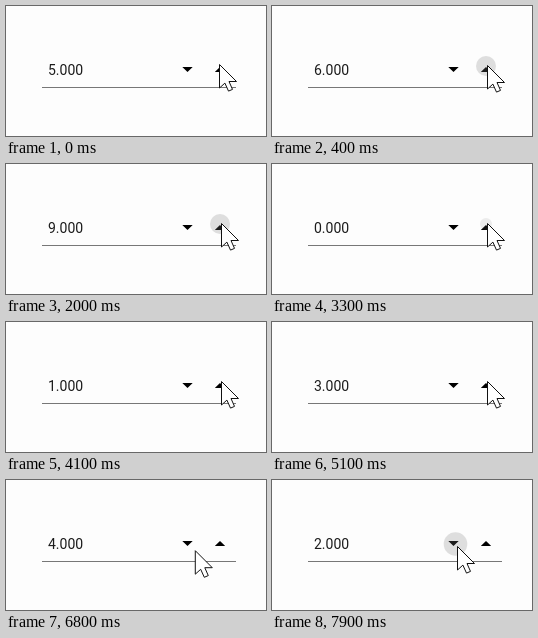
An HTML page that plays this animation: 260 px wide and 130 px high, repeating every 8 s.

```html
<!DOCTYPE html>
<html lang="en">
<head>
<meta charset="utf-8">
<title>Number spinner</title>
<style>
  html, body { margin: 0; width: 100%; height: 100%; overflow: hidden; background: #fdfdfd; }
  svg { display: block; width: 260px; height: 130px; }
  text { font: 14px Roboto, Arial, sans-serif; fill: #1c1c1c; }
</style>
</head>
<body>
<svg viewBox="0 0 260 130">
  <text id="value" x="42" y="69">5.000</text>
  <path d="M36 81.5H230" stroke="#777"/>
  <path d="M176.3 61h10.4l-5.2 5zM208.8 66h10.4l-5.2-5z"/>
  <circle id="ripple" fill="#777"/>
  <path id="cursor" d="M0 0V23.5L5.4 18.6L9 26.6L13 24.9L9.5 17H17Z" fill="#fff" stroke="#111"/>
</svg>
<script>
const LOOP = 8000, STEP = 100, MAX = 10;
const [value, ripple, cursor] = ['value', 'ripple', 'cursor'].map(id => document.getElementById(id));

const snap = t => Math.round(t / STEP) * STEP;
const clamp = x => Math.min(1, Math.max(0, x));
const mix = (a, b, k) => a + (b - a) * k;

// An even run of presses on one button; delta is the change per press.
const burst = (first, gap, count, delta) =>
  Array.from({ length: count }, (_, i) => ({ start: snap(first + i * gap), delta }));

const presses = [...burst(210, 545, 5, 1), ...burst(3340, 560, 5, 1), ...burst(7100, 700, 2, -1)];

// The value wraps; ripples on the up button get shorter as the presses go on.
let count = 5;
presses.forEach((press, i) => {
  count = (count + press.delta + MAX + 1) % (MAX + 1);
  press.value = count;
  press.life = press.delta > 0 ? 300 - 25 * i : 200;
});

// A short nudge onto the up button, later a sagging arc over to the down button.
function pointerAt(t) {
  const nudge = 1 - clamp(t / 100);
  const p = clamp((t - 6100) / 900);
  const k = p * p * (3 - 2 * p);
  const sag = 7.5 * Math.sin(Math.PI * k * k);
  return [mix(215.5, 185.5, k) - 2 * nudge, mix(59.5, 66.5, k) + sag - nudge];
}

function setAll(el, attrs) {
  for (const name in attrs) el.setAttribute(name, attrs[name]);
}

function draw(t) {
  const press = presses.findLast(p => p.start <= t);
  value.textContent = (press ? press.value : 5).toFixed(3);
  setAll(cursor, { transform: `translate(${pointerAt(t)})` });

  const age = press ? t - press.start : LOOP;
  const visible = press && age < press.life;
  setAll(ripple, { visibility: visible ? 'visible' : 'hidden' });
  if (!visible) return;
  const grow = clamp(age / 100);
  const [cx, cy, size] = press.delta > 0 ? [214, 60, 10] : [183.5, 64, 11.8];
  setAll(ripple, { cx, cy, r: size * mix(0.6, 1, grow), 'fill-opacity': mix(0.12, 0.23, grow) });
}

const begin = performance.now();
function tick() {
  const t = (performance.now() - begin) % LOOP;
  draw(Math.floor(t / STEP) * STEP);
  requestAnimationFrame(tick);
}
tick();
</script>
</body>
</html>
```
